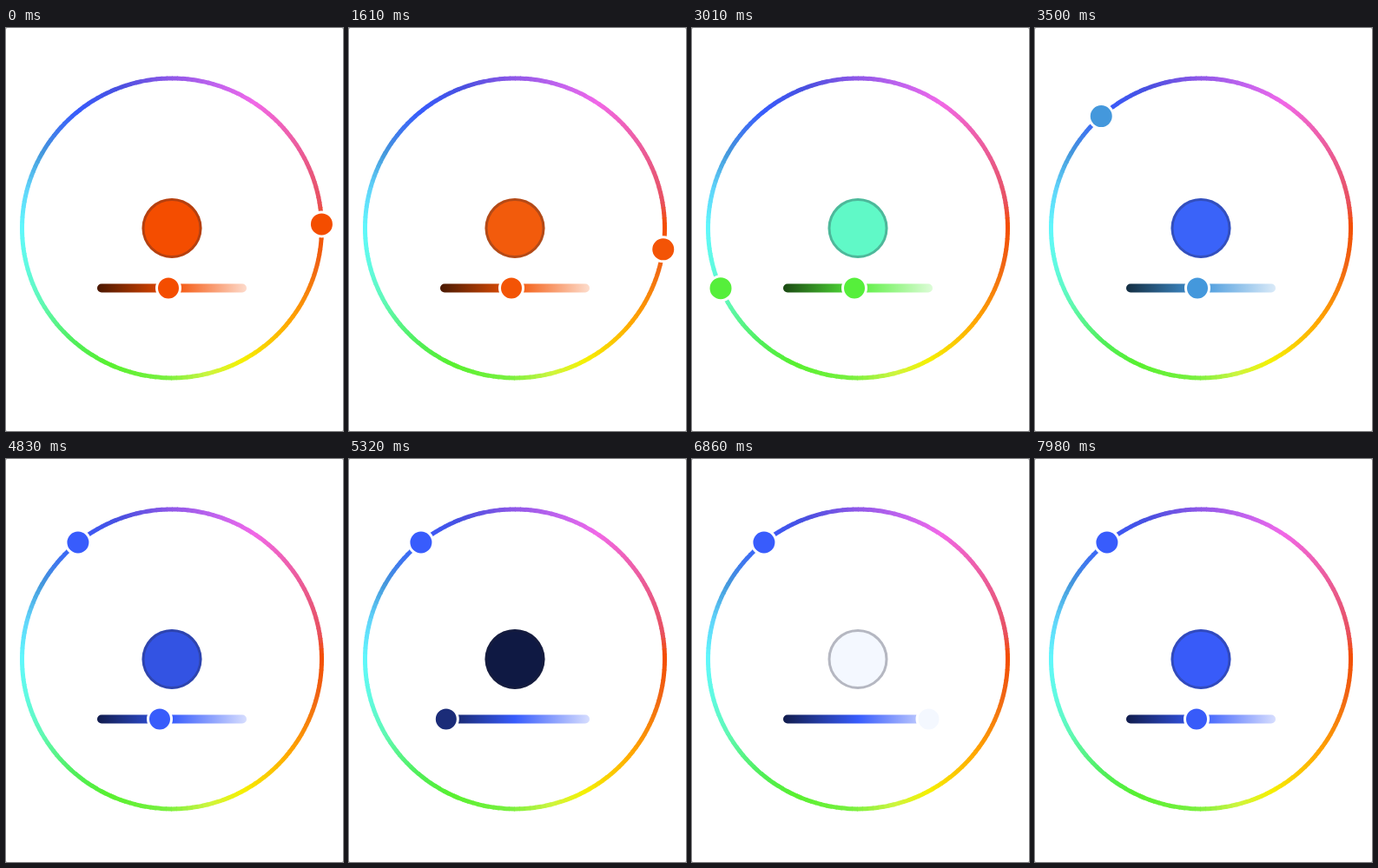
Animation, 388 px wide and 464 px high, one loop 8000 ms. Source, as an HTML page:

```html
<!DOCTYPE html>
<html lang="en">
<head>
<meta charset="utf-8">
<title>Color wheel</title>
<style>
  html, body { margin: 0; width: 100%; height: 100%; overflow: hidden; background: #999; }
  svg { display: block; width: 388px; height: 464px; }
</style>
</head>
<body>
<svg viewBox="0 0 388 464">
  <defs>
    <linearGradient id="shade">
      <stop offset="0"/><stop offset=".5"/><stop offset="1"/>
    </linearGradient>
  </defs>
  <rect width="388" height="464" rx="1.5" fill="#fff"/>
  <g id="ring" fill="none" stroke-width="5"></g>
  <circle id="swatch" cx="191" cy="230.4" r="34.5"/>
  <circle cx="191" cy="230.4" r="33" fill="none" stroke="#222233" stroke-opacity=".3" stroke-width="3"/>
  <rect x="105" y="294.5" width="172" height="10" rx="5" fill="url(#shade)"/>
  <circle id="hueKnob" r="14" stroke="#fff" stroke-width="3"/>
  <circle id="shadeKnob" cy="299.5" r="13.5" stroke="#fff" stroke-width="3"/>
</svg>
<script>
const LOOP = 8000, STEP = 70, LAG = 180;
const CX = 191, CY = 230.4, R = 172.5, MID = 187;
const $ = id => document.getElementById(id);

// Wheel colours by clockwise angle from three o'clock
const wheel = [
  [-10, 'e85060'], [-1.5, 'f44d00'], [14, 'f06414'], [38, 'ffa500'], [62, 'f6f000'],
  [76, 'ccf540'], [92, '78f040'], [115, '58f030'], [130, '50ee58'], [150, '60f8b4'],
  [165, '60fae0'], [180, '60f8fc'], [195, '60d4fa'], [210, '4498dc'], [220, '4078ee'],
  [231, '385cfc'], [250, '4a50e0'], [270, '9058e8'], [288, 'c464ee'], [303, 'f068e8'],
  [320, 'ee60b0'], [338, 'e85880'], [350, 'e85060']
].map(([a, hex]) => [a, hex.match(/../g).map(h => parseInt(h, 16))]);

// [time, value] keys of the two drags
const hueKeys = [[1050, -1.5], [2340, 40], [2520, 62.3], [3320, 210], [3500, 228.3], [3850, 231.2]];
const shadeKeys = [[4620, 187], [4830, 177], [5380, 110], [5560, 112], [5700, 133],
  [5880, 179], [6450, 272.5], [6880, 272.5], [7700, 186]];

const mix = (a, b, k) => a.map((v, i) => v + (b[i] - v) * k);
const css = c => `rgb(${c.map(Math.round)})`;

function wheelColor(angle) {
  const a = angle > 350 ? angle - 360 : angle;
  const i = wheel.findIndex(s => s[0] >= a);
  if (i < 1) return wheel[0][1];
  const [a0, c0] = wheel[i - 1], [a1, c1] = wheel[i];
  return mix(c0, c1, (a - a0) / (a1 - a0));
}

// Smooth monotone curve through the keys
function follow(keys, t) {
  const last = keys.length - 1;
  if (t <= keys[0][0]) return keys[0][1];
  if (t >= keys[last][0]) return keys[last][1];
  const slope = i => (keys[i + 1][1] - keys[i][1]) / (keys[i + 1][0] - keys[i][0]);
  const tangent = i => {
    if (i === 0 || i === last) return 0;
    const p = slope(i - 1), q = slope(i);
    return p * q > 0 ? 2 * p * q / (p + q) : 0;
  };
  const i = keys.findIndex(k => k[0] > t) - 1;
  const [t0, v0] = keys[i], [t1, v1] = keys[i + 1];
  const h = t1 - t0, u = (t - t0) / h, w = 1 - u;
  return v0 * (1 + 2 * u) * w * w + v1 * u * u * (3 - 2 * u)
    + h * u * w * (tangent(i) * w - tangent(i + 1) * u);
}

const BLACK = [0, 0, 0], WHITE = [255, 255, 255], PALE = [250, 253, 255];
const shaded = (c, x) => x < MID
  ? mix(c, BLACK, (MID - x) / 77 * .75)
  : mix(c, PALE, Math.min(1, (x - MID) / 85.5) * .97);

function point(deg) {
  const a = deg * Math.PI / 180;
  return [CX + R * Math.cos(a), CY + R * Math.sin(a)];
}

let arcs = '';
for (let a = 0; a < 360; a += 2) {
  arcs += `<path d="M${point(a)}A${R} ${R} 0 0 1 ${point(a + 2.3)}" stroke="${css(wheelColor(a + 1))}"/>`;
}
$('ring').innerHTML = arcs;

const stops = document.querySelectorAll('#shade stop');

function draw(t) {
  const angle = follow(hueKeys, t), x = follow(shadeKeys, t);
  const hue = wheelColor(angle);
  const lateHue = wheelColor(follow(hueKeys, t - LAG));
  const lateX = follow(shadeKeys, t - LAG);
  const [kx, ky] = point(angle);

  $('swatch').setAttribute('fill', css(shaded(hue, x)));
  $('hueKnob').setAttribute('cx', kx);
  $('hueKnob').setAttribute('cy', ky);
  $('hueKnob').setAttribute('fill', css(lateHue));
  $('shadeKnob').setAttribute('cx', x);
  $('shadeKnob').setAttribute('fill', css(shaded(lateHue, lateX)));
  [mix(lateHue, BLACK, .7), lateHue, mix(lateHue, WHITE, .8)]
    .forEach((c, i) => stops[i].setAttribute('stop-color', css(c)));
}

const start = performance.now();
function tick() {
  const t = (performance.now() - start) % LOOP;
  draw(Math.floor(t / STEP) * STEP);
  requestAnimationFrame(tick);
}
tick();
</script>
</body>
</html>
```
